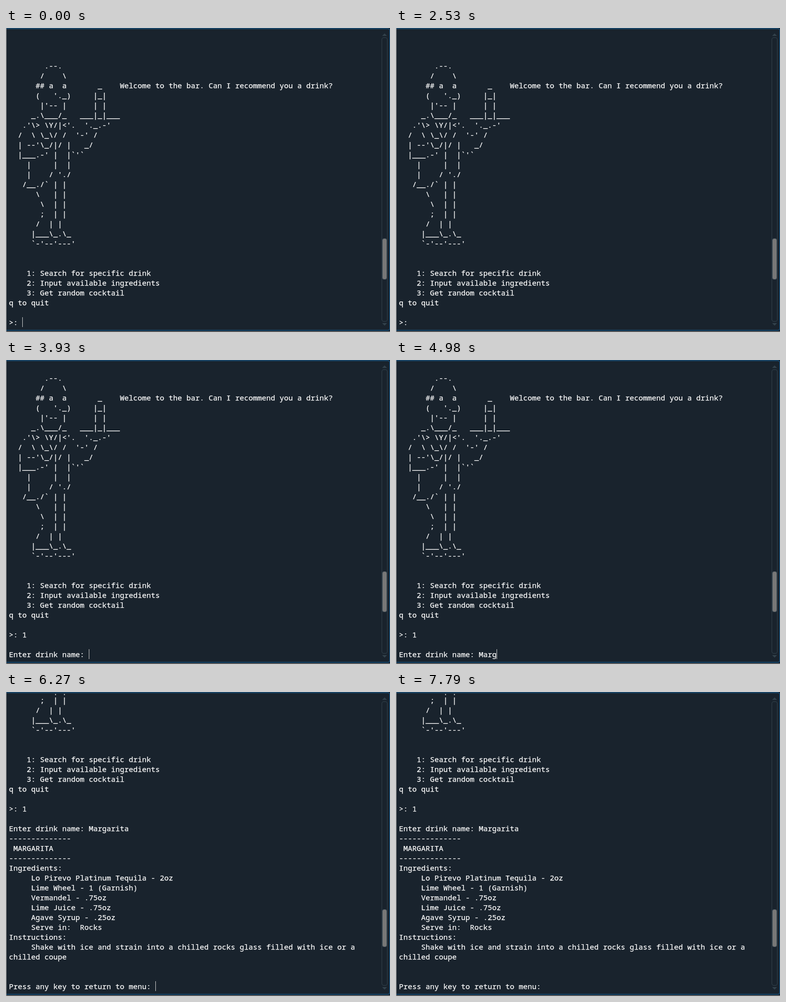
These frames come from a looping animation (779x616 px, 8000 ms). An HTML page:

```html
<!DOCTYPE html>
<html lang="en">
<head>
<meta charset="utf-8">
<title>Bar console</title>
<style>
  html, body { margin: 0; width: 100%; height: 100%; overflow: hidden; background: #19232d; }
  #stage { position: relative; width: 779px; height: 616px; overflow: hidden; background: #19232d; }
  #stage > * { position: absolute; box-sizing: border-box; }
  #frame { left: 0; top: 1px; width: 779px; height: 612px; border: 1px solid #1464a0; border-radius: 0 4px 4px 0; }
  #edge { left: 0; top: 0; width: 779px; height: 616px; border: solid #a0a0a0; border-width: 0 0 1px 1px; }
  #view { left: 6px; top: 4px; width: 754px; height: 602px; overflow: hidden; }
  #text {
    position: absolute; left: 0; bottom: 0; margin: 0; color: #fff; white-space: pre;
    font: 15px/20px "Noto Sans Mono", "DejaVu Sans Mono", monospace;
    -webkit-text-stroke: 0.25px #fff;
  }
  #caret { top: 586px; width: 1px; height: 20px; background: #ccc; }
  #track { left: 762px; top: 19px; width: 12px; height: 576px; border: 1px solid #32414b; border-radius: 4px; }
  #thumb { left: 763px; width: 10px; background: #787878; border: 1px solid #32414b; border-radius: 4px; }
  #arrows { left: 0; top: 0; fill: #32414b; }
</style>
</head>
<body>
<div id="stage">
  <div id="frame"></div>
  <div id="edge"></div>
  <div id="view"><pre id="text"></pre></div>
  <div id="caret"></div>
  <div id="track"></div>
  <div id="thumb"></div>
  <svg id="arrows" width="779" height="616">
    <path d="M763 16l5-5 5 5zM763 598l5 5 5-5z"/>
  </svg>
</div>

<script type="text/plain" id="menu">
        .--.
       /    \
      ## a  a       _    Welcome to the bar. Can I recommend you a drink?
      (   '._)     |_|
       |'-- |      | |
     _.\___/_   ___|_|___
   .'\> \Y/|<'.  '._.-'
  /  \ \_\/ /  '-' /
  | --'\_/|/ |   _/
  |___.-' |  |`'`
    |     |  |
    |    / './
   /__./` | |
      \   | |
       \  | |
       ;  | |
      /  | |
     |___\_.\_
     `-'--'---'


    1: Search for specific drink
    2: Input available ingredients
    3: Get random cocktail
q to quit

>: </script>

<script type="text/plain" id="recipe">
--------------
 MARGARITA
--------------
Ingredients:
     Lo Pirevo Platinum Tequila - 2oz
     Lime Wheel - 1 (Garnish)
     Vermandel - .75oz
     Lime Juice - .75oz
     Agave Syrup - .25oz
     Serve in:  Rocks
Instructions:
     Shake with ice and strain into a chilled rocks glass filled with ice or a
chilled coupe


Press any key to return to menu: </script>

<script>
const $ = id => document.getElementById(id);
const LOOP = 8000;
const drink = 'Margarita';
const menu = $('menu').textContent.slice(1);
const ask = menu + '1\n\nEnter drink name: ';
const result = ask + drink + $('recipe').textContent;

// start time, text, thumb top, thumb height
const screens = [
  [0, menu, 426, 84],
  [3090, menu + '1', 426, 84],
  [3930, ask, 428, 83],
  [6270, result, 440, 77]
];
const keys = [4460, 4660, 4720, 4930, 5070, 5170, 5430, 5550, 5610];

// the caret is hidden between each pair of times
const hidden = [
  [430, 960], [1490, 2020], [2530, 3090], [3600, 3930], [4990, 5070],
  [5490, 5550], [6010, 6270], [6800, 7330], [7790, LOOP]
];

let shown = '';

function render(t) {
  let [, text, top, height] = screens.filter(s => s[0] <= t).pop();
  if (text === ask) text += drink.slice(0, keys.filter(k => k <= t).length);
  if (text !== shown) {
    shown = text;
    $('text').textContent = text;
    $('caret').style.left = 6 + 9 * text.split('\n').pop().length + 'px';
    $('thumb').style.top = top + 'px';
    $('thumb').style.height = height + 'px';
  }
  const off = hidden.some(([from, to]) => t >= from && t < to);
  $('caret').style.visibility = off ? 'hidden' : 'visible';
}

const start = performance.now();
function tick() {
  render((performance.now() - start) % LOOP);
  requestAnimationFrame(tick);
}
tick();
</script>
</body>
</html>
```
